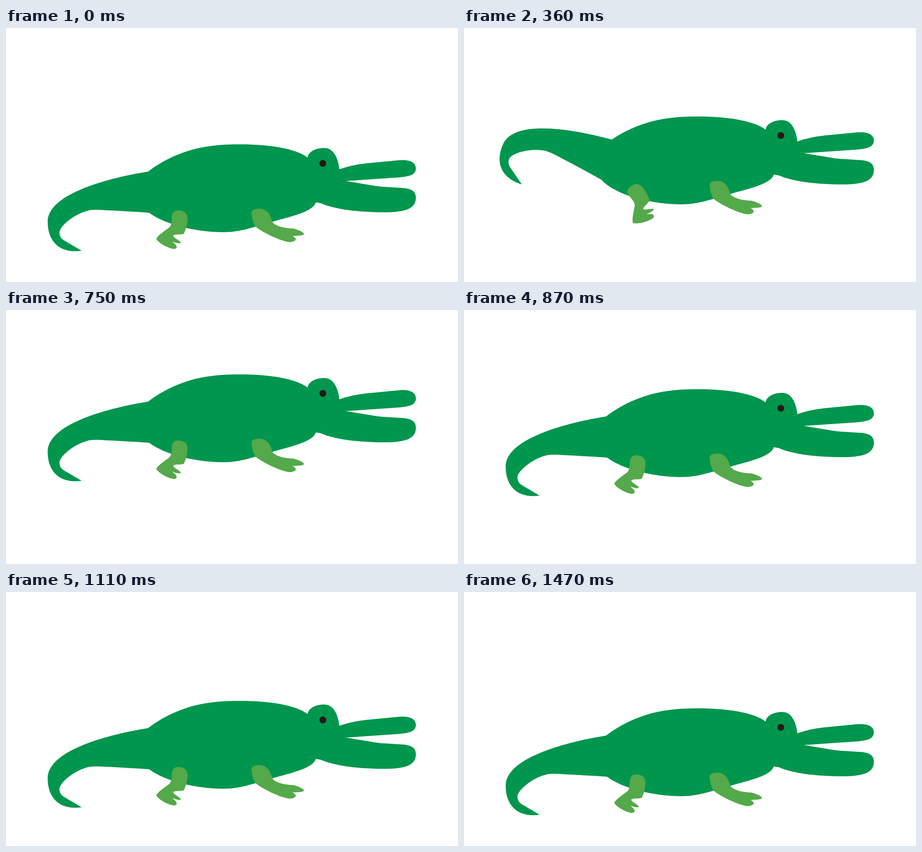
Recreate the animation shown at these times as an HTML page with a canvas. Size 998 by 561 pixels, loop 1500 ms.

```html
<!DOCTYPE html>
<html lang="en">
<head>
<meta charset="utf-8">
<title>Crocodile</title>
<style>
  html, body { margin: 0; width: 100%; height: 100%; overflow: hidden; background: #fff; }
  canvas { display: block; }
</style>
</head>
<body>
<canvas id="stage" width="998" height="561"></canvas>
<script>
const ctx = document.getElementById('stage').getContext('2d');
const LOOP = 1500, STEP = 30;
const GREEN = '#00964d', LEG_GREEN = '#54a94a', DARK = '#231815';

const shapes = {
  tail: new Path2D(`M350 314 L314 317 C210 334 92 370 92 428 C92 468 115 499 167 492
    L128 469 Q118 463 118 452 C118 438 150 411 182 403 Q195 400.5 220 402.5
    Q265 404.5 316 408 L348 410 Z`),
  body: new Path2D(`M314 317 C350 289 400 267 450 261 C475 257 500 257 520 257
    C580 257 640 266 666 286 L700 300 L700 386 L684 385
    C679 406 626 417 588 428 C550 438 520 451 480 451
    C420 451 350 434 316 408 C303 398 291 384 290 362 C289 343 298 328 314 317 Z`),
  head: new Path2D(`M666 286 C668 272 685 265 703 265 C722 265 733 285 736 312
    L738 320 V336 L805 347 Q827 351 840 351 L870 353 C895 354 905 360 905 375
    C905 400 880 407 835 407 C780 407 727 401 695 387 L684 385 L650 380 Z`),
  jaw: new Path2D(`M718 318 L736 312 Q765 302 795 299 L868 292
    C892 290 905 297 905 310 C905 323 893 328 868 330 L751 338 L720 340 Z`),
  hindLeg: new Path2D(`M366 420 Q366 403 380 403 C395 403 401 411 401 422
    Q400 438 393 454 Q390 456 380 456 Q371 456 369 459 Q371 463 378 467
    Q386 472 386 475 Q382 477 367 472 Q377 479 377 484 Q376 488 370 488
    C356 486 336 474 332 466 C333 459 355 445 361 440 Q366 435 366 420 Z`),
  frontLeg: new Path2D(`M542 409 Q542 399 559 399 C576 399 584 412 588 428
    C594 437 612 442 635 443 Q656 449 658 455 Q657 459 633 459
    Q640 464 640 467 Q638 472 627 473 C605 471 565 450 554 441
    Q545 435 542 409 Z`)
};

// Linear interpolation through [time, value] keys.
function track(keys, t) {
  for (let i = 1; i < keys.length; i++) {
    const [t0, v0] = keys[i - 1], [t1, v1] = keys[i];
    if (t <= t1) return v0 + (v1 - v0) * (t - t0) / (t1 - t0);
  }
  return keys[keys.length - 1][1];
}

const motion = {
  lift: [[0, 0], [720, -123], [1170, 0]],
  tail: [[0, 0], [510, 35.4], [720, 0]],
  frontLeg: [[0, 0], [180, 105], [360, 0], [510, 105], [720, 0]],
  hindLeg: [[0, 0], [165, 0], [510, -76], [720, 0]],
  jaw: [[0, 0], [1170, 0], [1260, -29.7], [1380, 10], [1470, 0]]
};

const pivots = {
  tail: [339.5, 360.5], frontLeg: [565, 419.5], hindLeg: [386, 426.3], jaw: [706, 336.5]
};

function drawPart(name, color, t) {
  const [x, y] = pivots[name];
  ctx.save();
  ctx.translate(x, y);
  ctx.rotate(track(motion[name], t) * Math.PI / 180);
  ctx.translate(-x, -y);
  ctx.fillStyle = color;
  ctx.fill(shapes[name]);
  ctx.restore();
}

function draw(t) {
  ctx.fillStyle = '#fff';
  ctx.fillRect(0, 0, 998, 561);
  ctx.save();
  ctx.translate(0, track(motion.lift, t));
  drawPart('tail', GREEN, t);
  drawPart('jaw', GREEN, t);
  ctx.fillStyle = GREEN;
  ctx.fill(shapes.body);
  ctx.fill(shapes.head);
  drawPart('hindLeg', LEG_GREEN, t);
  drawPart('frontLeg', LEG_GREEN, t);
  ctx.fillStyle = DARK;
  ctx.beginPath();
  ctx.arc(699.5, 299, 7.5, 0, Math.PI * 2);
  ctx.fill();
  ctx.restore();
}

const start = performance.now();
function tick() {
  const t = (performance.now() - start) % LOOP;
  draw(Math.floor(t / STEP) * STEP);
  requestAnimationFrame(tick);
}
draw(0);
requestAnimationFrame(tick);
</script>
</body>
</html>
```
